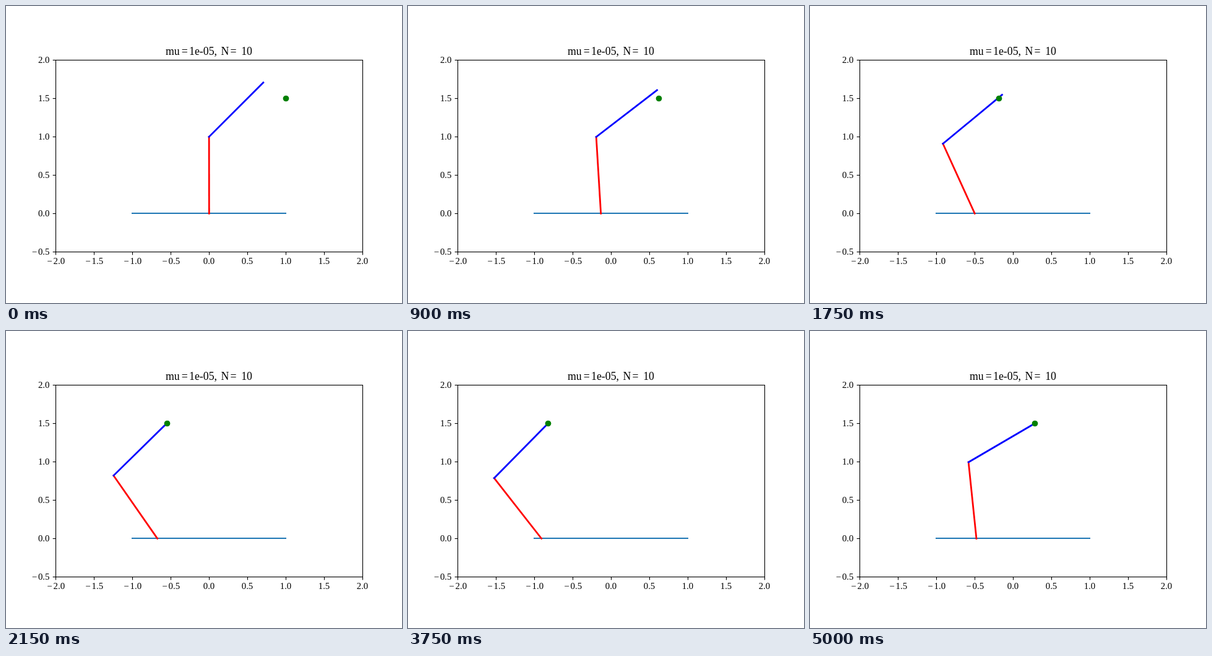
Recreate the animation shown at these times as an HTML page. Size 640 px wide and 480 px high, loop 5050 ms.

```html
<!DOCTYPE html>
<html lang="en">
<head>
<meta charset="utf-8">
<title>Arm tracking a moving point</title>
<style>
  html, body { margin: 0; width: 100%; height: 100%; overflow: hidden; background: #fff; }
  svg { display: block; width: 640px; height: 480px; }
  text { font: 14.8px "Liberation Serif", serif; text-anchor: middle; }
  .title { font-size: 17.8px; }
  .axis { fill: none; stroke: #000; stroke-width: 1.11; }
  .arm { fill: none; stroke-width: 2.78; stroke-linecap: square; }
</style>
</head>
<body>
<svg id="plot" viewBox="0 0 640 480"></svg>
<script>
const STEP = 50, LOOP = 5050, GOAL_Y = 1.5;
const { sin, cos, asin, exp, floor } = Math;
const plot = document.getElementById('plot');
const px = x => 328 + 124 * x;
const py = y => 335.4 - 124 * y;
const snap = v => floor(v) + 0.5;

function add(tag, attrs, text = '') {
  const node = document.createElementNS('http://www.w3.org/2000/svg', tag);
  for (const key in attrs) node.setAttribute(key, attrs[key]);
  node.textContent = text;
  plot.append(node);
  return node;
}

// The minus sign gets its own slot before the digits.
function tickLabel(value, x, y) {
  add('text', { x, y }, Math.abs(value).toFixed(1));
  if (value < 0) add('text', { x: x - 15.3, y }, '\u2212');
}

add('path', { d: 'M203 335H453', stroke: '#1f77b4', 'stroke-width': 2.08 });
const lower = add('path', { class: 'arm', stroke: '#f00' });
const upper = add('path', { class: 'arm', stroke: '#00f' });
const goal = add('circle', { r: 4.86, cy: snap(py(GOAL_Y)), fill: '#008000' });

add('rect', { class: 'axis', x: 80.5, y: 87.5, width: 496, height: 310 });
for (let v = -2; v <= 2; v += 0.5) {
  const x = px(v);
  add('path', { class: 'axis', d: `M${snap(x)} 397.5v4.86` });
  tickLabel(v, v < 0 ? x + 5.8 : x, 417.3);
}
for (let v = -0.5; v <= 2; v += 0.5) {
  const y = py(v);
  add('path', { class: 'axis', d: `M80.5 ${snap(y)}h-4.86` });
  tickLabel(v, 61.2, y + 4.6);
}
[['mu', 269.4], ['=', 288.7], ['1e-05,', 318.5], ['N', 353.8], ['=', 367.4], ['10', 389.1]]
  .forEach(([word, x]) => add('text', { class: 'title', x, y: 79 }, word));

const bump = (t, center, width) => exp(-(((t - center) / width) ** 2));

// Swing of the lower link, in radians left of vertical.
const leanAt = t => 0.379 + 0.409 * sin(1.19 * (t - 1.65)) + 0.065 * bump(t, 4.3, 0.8);

// Distance of the tip from the goal, fading as the arm catches up.
const errorX = t => -0.293 * exp(-1.9 * t) + 0.055 * bump(t, 1.45, 0.75);
const errorY = t => 0.207 * exp(-0.72 * t - 0.0076 * t ** 6);

const segment = (x1, y1, x2, y2) => `M${px(x1)} ${py(y1)}L${px(x2)} ${py(y2)}`;

function draw(ms) {
  const t = floor(ms % LOOP / STEP) * STEP / 1000;
  const goalX = cos(t), tipX = goalX + errorX(t), tipY = GOAL_Y + errorY(t);
  const lean = leanAt(t), elbowY = cos(lean);
  const elbowX = tipX - cos(asin(tipY - elbowY));
  lower.setAttribute('d', segment(elbowX + sin(lean), 0, elbowX, elbowY));
  upper.setAttribute('d', segment(elbowX, elbowY, tipX, tipY));
  goal.setAttribute('cx', snap(px(goalX)));
}

const start = performance.now();
function tick() {
  draw(performance.now() - start);
  requestAnimationFrame(tick);
}
tick();
</script>
</body>
</html>
```
